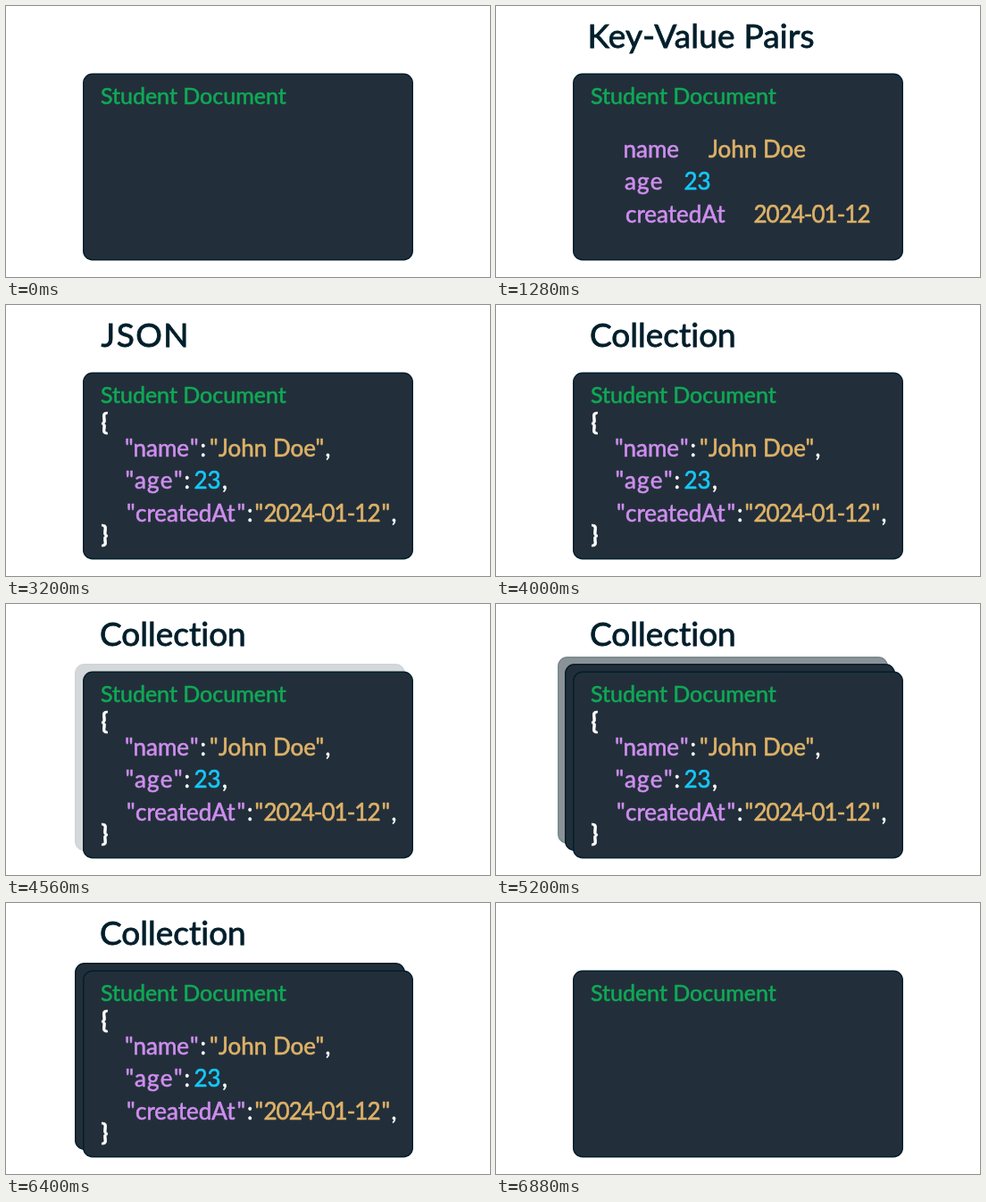
Animation, 542 px wide and 304 px high, one loop 7040 ms. Source, as an HTML page:

```html
<!DOCTYPE html>
<html lang="en">
<head>
<meta charset="utf-8">
<title>Student Document</title>
<style>
  html, body { margin: 0; width: 100%; height: 100%; overflow: hidden; background: #fff; }
  svg { display: block; width: 100%; height: 100%; }
  rect { fill: #222f3a; stroke: #001e2b; stroke-width: 1.5; }
  text {
    font: 26px Lato, "Open Sans", sans-serif;
    font-variant-ligatures: none;
    stroke-width: .6;
    white-space: pre;
  }
  .title { font-size: 37px; fill: #001e2b; stroke: #001e2b; stroke-width: .8; }
  .header { font-size: 25px; fill: #10a956; stroke: #10a956; }
  .key { fill: #cf8eef; stroke: #cf8eef; }
  .string { fill: #dfb268; stroke: #dfb268; }
  .number { fill: #16c8f8; stroke: #16c8f8; }
  .mark { fill: #fff; stroke: #fff; }
  .brace { fill: #fff; stroke: #fff; font-weight: 700; }
</style>
</head>
<body>
<svg id="stage" viewBox="0 0 542 304"></svg>
<script>
const LOOP = 7040, STEP = 80, CLEAR = 6480;
const CARD_FADE = 330, TEXT_FADE = 220;
const TITLE_Y = 46.5, ROWS = [169.5, 206, 242.5];
const stage = document.getElementById('stage');
const layers = [];

function add(parent, tag, attrs, content = '') {
  const node = document.createElementNS('http://www.w3.org/2000/svg', tag);
  for (const name in attrs) node.setAttribute(name, attrs[name]);
  node.textContent = content;
  parent.append(node);
  return node;
}

function layer(start, end = CLEAR, fade = TEXT_FADE) {
  const node = add(stage, 'g', {});
  layers.push({ node, start, end, fade });
  return node;
}

const card = (parent, x, y) =>
  add(parent, 'rect', { x, y, width: 368.5, height: 208.5, rx: 10 });

const label = (parent, kind, x, y, content, spacing = 0) =>
  add(parent, 'text', { class: kind, x, y, 'letter-spacing': spacing }, content);

// Stack of documents, back to front
card(layer(5030, 5960, CARD_FADE), 69.75, 59.75);
card(layer(4470, CLEAR, CARD_FADE), 77.75, 67.75);
card(stage, 86.75, 76.25);
label(stage, 'header', 106, 110, 'Student Document');

// Headings
label(layer(420, 1800), 'title', 102.5, TITLE_Y, 'Key-Value Pairs', .2);
label(layer(1800, 3200), 'title', 106.5, TITLE_Y, 'JSON', 1.5);
label(layer(3200), 'title', 105, TITLE_Y, 'Collection');

// Fields
const [nameY, ageY, dateY] = ROWS;
const first = layer(420);
label(first, 'key', 142.5, nameY, 'name');
label(first, 'string', 238, nameY, 'John Doe');
const second = layer(500);
label(second, 'key', 144, ageY, 'age', 1.2);
label(second, 'number', 210.5, ageY, '23');
const third = layer(1050);
label(third, 'key', 145, dateY, 'createdAt');
label(third, 'string', 288.5, dateY, '2024-01-12', -1);

// JSON punctuation
const json = layer(1910);
label(json, 'brace', 106.5, 140.5, '{');
label(json, 'brace', 106.5, 266.5, '}');

function punctuate(y, colon, comma, keyQuotes, stringQuotes = []) {
  label(json, 'mark', colon, y, ':');
  label(json, 'mark', comma, y, ',');
  keyQuotes.forEach(x => label(json, 'key', x, y, '"'));
  stringQuotes.forEach(x => label(json, 'string', x, y, '"'));
}
punctuate(nameY, 217.5, 357.5, [133, 206], [228, 346.5]);
punctuate(ageY, 199.5, 242, [133.5, 188]);
punctuate(dateY, 270, 431.5, [135, 258.5], [278.5, 420.5]);

function progress(time, start, fade) {
  const p = Math.min(1, Math.max(0, (time - start) / fade));
  return p * p * (3 - 2 * p);
}

function draw() {
  const time = Math.floor((performance.now() % LOOP) / STEP) * STEP;
  for (const { node, start, end, fade } of layers)
    node.setAttribute('opacity', progress(time, start, fade) - progress(time, end, fade));
  requestAnimationFrame(draw);
}

draw();
</script>
</body>
</html>
```
